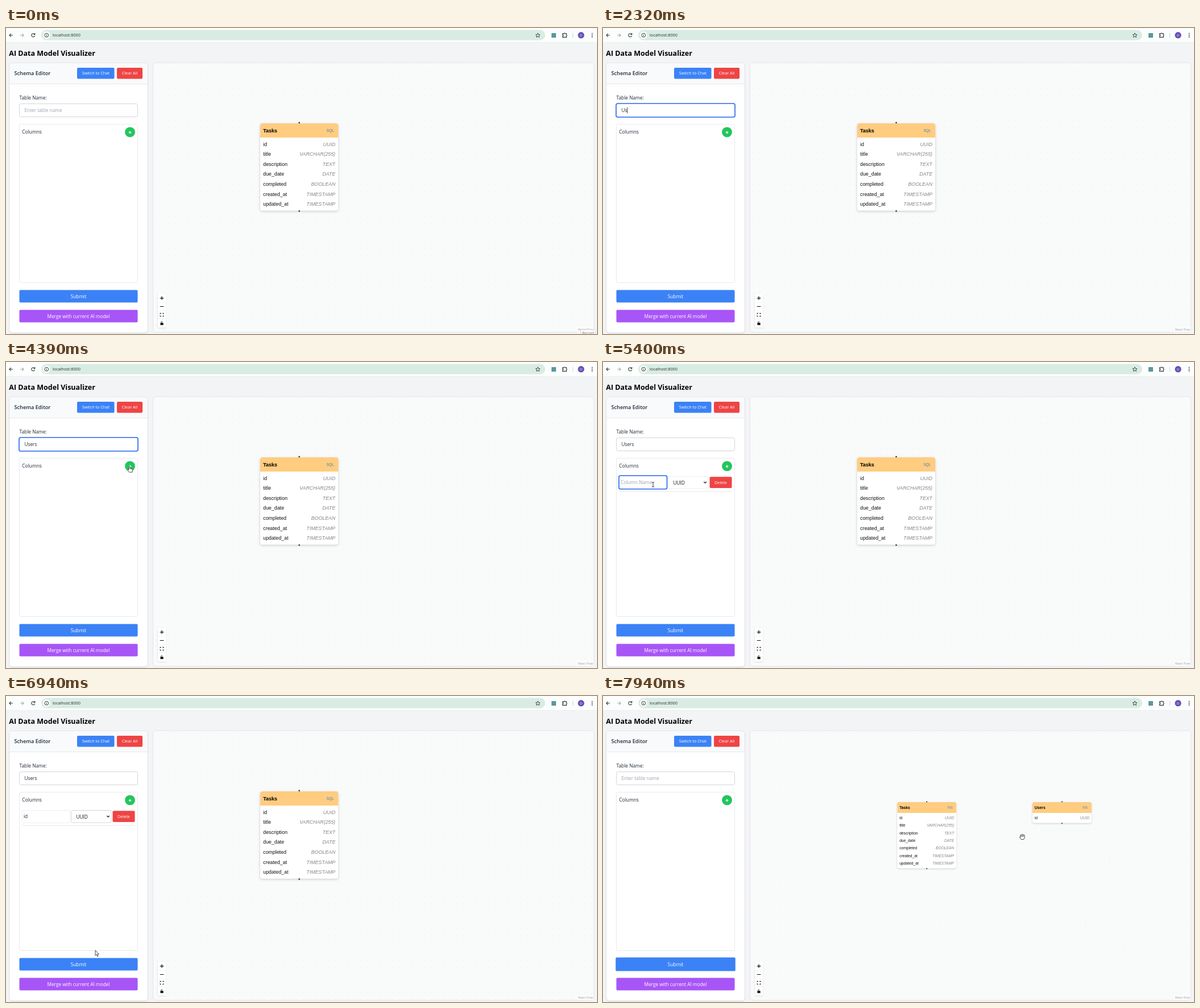
Recreate the animation shown at these times as an HTML page. Size 1039 px wide and 539 px high, loop 8000 ms.

```html
<!DOCTYPE html>
<html lang="en">
<head>
<meta charset="utf-8">
<title>Data model editor</title>
<style>
html, body { margin: 0; width: 100%; height: 100%; overflow: hidden; background: #f3f4f6; }
svg { display: block; font-family: "Open Sans", "Noto Sans", sans-serif; }
.node { font-family: "Liberation Sans", Arial, sans-serif; }
text { white-space: pre; }
</style>
</head>
<body>
<svg id="stage" width="1039" height="539" viewBox="0 0 1039 539"></svg>
<script>
const LOOP = 8000, STEP = 200 / 3;
const BLUE = '#3b82f6', INK = '#1f2937', MUTED = '#9ca3af', LINE = '#e5e7eb';

const rect = (x, y, w, h, fill, r = 0, more = '') =>
  `<rect x="${x}" y="${y}" width="${w}" height="${h}" rx="${r}" fill="${fill}" ${more}/>`;
const text = (x, y, s, size, fill, more = '') =>
  `<text x="${x}" y="${y}" font-size="${size}" fill="${fill}" ${more}>${s}</text>`;
const line = (d, stroke, w = 1, more = '') =>
  `<path d="${d}" fill="none" stroke="${stroke}" stroke-width="${w}" ${more}/>`;
const dot = (x, y, r, fill, more = '') =>
  `<circle cx="${x}" cy="${y}" r="${r}" fill="${fill}" ${more}/>`;
const group = (id, body, more = '') => `<g id="${id}" ${more}>${body}</g>`;
const MID = 'text-anchor="middle"', END = 'text-anchor="end"';
const stroke = c => `stroke="${c}"`;

function browserBar() {
  const dark = '#333b38';
  return rect(0, 0, 1039, 25, '#fbfefc') + rect(0, 25, 1039, 1, '#e9eeec') +
    rect(62, 3.5, 886, 18, '#d9ece4', 9) +
    line('M12 12.7H6M8.8 9.8L5.9 12.7L8.8 15.6', dark, 1.1) +
    line('M25 12.7H31M28.2 9.8L31.1 12.7L28.2 15.6', '#a3aaa7', 1.1) +
    line('M50.3 11A3 3 0 1 0 50.7 13.6M50.8 9V11.4H48.4', dark, 1.1) +
    dot(71.3, 12.7, 6.5, '#fbfefc') +
    dot(71.3, 12.7, 3.4, 'none', stroke(dark)) + line('M71.3 12.2V14.7M71.3 10.7V11.5', dark, .9) +
    text(82, 15.4, 'localhost:8000', 7.25, '#26302c') +
    line('M935 8.9L936.1 11.5L938.9 11.7L936.8 13.5L937.5 16.3L935 14.8L932.5 16.3L933.2 13.5L931.1 11.7L933.9 11.5Z', dark, .9) +
    rect(959, 9, 8, 8, '#5e979d') +
    line('M978.6 9.8H980.8A1.3 1.3 0 0 1 983.2 9.8H985.2V11.8A1.3 1.3 0 0 1 985.2 14.2V16.4H978.6V14.2A1.2 1.2 0 0 0 978.6 11.8Z', dark, 1.2) +
    rect(996, 9, 1, 8, '#b9ddd4') +
    dot(1011, 12.7, 5.6, '#6750b5') + text(1011, 14.7, 'D', 5.5, '#fff', MID) +
    [9.6, 12.7, 15.8].map(y => dot(1030.5, y, .95, dark)).join('');
}

function editor() {
  return text(5.3, 48.6, 'AI Data Model Visualizer', 12.5, '#000', 'font-weight="700"') +
    rect(6, 61.5, 243, 475, '#fff', 5, 'filter="url(#soft)"') +
    '<path d="M6 98V66.5a5 5 0 0 1 5-5h233a5 5 0 0 1 5 5V98Z" fill="#f9fafb"/>' +
    rect(6, 98, 243, 1, LINE) + rect(6, 61.5, 243, 475, 'none', 5, stroke('#e9ebee')) +
    text(14.5, 83.2, 'Schema Editor', 9.2, INK, 'font-weight="600"') +
    rect(125, 70, 65.5, 19.5, BLUE, 2) + text(157.8, 82.4, 'Switch to Chat', 7.25, '#fff', MID) +
    rect(195, 70, 45, 19.5, '#ef4444', 2) + text(217.5, 82.4, 'Clear All', 7.25, '#fff', MID) +
    text(23.5, 125.9, 'Table Name:', 8.35, INK) +
    rect(23.5, 133.5, 208, 23, '#fff', 3, stroke('#d1d5db')) +
    rect(23, 133, 209, 24, '#fff', 3, `id="nameRing" stroke="#2563eb" stroke-width="1.6"`) +
    text(32.5, 148.2, '', 8.25, MUTED, 'id="name"') +
    rect(23.5, 169.5, 208, 279, '#fff', 2, stroke('#e8eaed')) +
    text(28.3, 186.4, 'Columns', 8.4, INK) +
    dot(218, 183.4, 8.9, '#22c55e') + line('M218 181.4V186.4M215.5 183.9H220.5', '#fff', 1.2) +
    group('submit', rect(23.5, 461.5, 208, 22, BLUE, 2) + text(127.4, 475.6, 'Submit', 8.25, '#fff', MID)) +
    rect(23.5, 496.5, 208, 22, '#a855f7', 2) +
    text(127.4, 510.7, 'Merge with current AI model', 8.25, '#fff', MID) +
    group('row',
      rect(28.5, 201.5, 84, 22, '#fff', 2, stroke('#eceef0')) +
      rect(28, 200.3, 84.5, 23.4, '#fff', 2.5, 'id="colRing" stroke="#2563eb" stroke-width="1.6"') +
      text(31, 215.2, '', 8.25, MUTED, 'id="col"') +
      rect(115, 201.5, 70, 21.5, '#fff', 2, 'id="select" stroke="#d1d5db"') +
      text(123.4, 215.6, 'UUID', 8.25, '#111') + line('M177.4 211L179.6 213.2L181.8 211', '#111', 1.2) +
      rect(187.5, 202.2, 39, 19.8, '#ef4444', 2) + text(207, 214.8, 'Delete', 7.25, '#fff', MID) +
      rect(28, 227.5, 199, 1, LINE)) +
    group('menu', rect(77.5, 162, 84.5, 24, '#fff', 3, 'filter="url(#soft)"') +
      text(84, 176.4, "Recipe's", 6.9, '#1c2421')) +
    rect(0, 0, .8, 11, '#111', 0, 'id="caret"');
}

function table(x, name, rows) {
  const y = 168, w = 137, step = 17.58, h = 30.4 + rows.length * step, cx = x + w / 2;
  return rect(x, y, w, h, '#fff', 4, 'filter="url(#lift)"') +
    `<path d="M${x} ${y + 25}V${y + 4}a4 4 0 0 1 4-4h${w - 8}a4 4 0 0 1 4 4v21Z" fill="#ffcc80"/>` +
    text(x + 5, y + 16.2, name, 9, '#000', 'font-weight="700"') +
    text(x + w - 7.5, y + 14.7, 'SQL', 6.5, '#3f83b8', END) +
    rows.map(([key, type], i) => {
      const by = y + 39.6 + i * step;
      return text(x + 5, by, key, 8.9, '#111') +
        text(x + w - 5, by, type, 8.8, '#85858a', END + ' font-style="italic"');
    }).join('') +
    dot(cx, y - 1.2, 1.3, '#222') + dot(cx, y + h + 1, 1.3, '#222');
}

function canvas() {
  const tasks = [['id', 'UUID'], ['title', 'VARCHAR(255)'], ['description', 'TEXT'], ['due_date', 'DATE'],
    ['completed', 'BOOLEAN'], ['created_at', 'TIMESTAMP'], ['updated_at', 'TIMESTAMP']];
  const icons = line('M270.7 475.8H277.3M274 472.5V479.1M270.7 490.5H277.3', '#111', 1.2) +
    line('M271 504V502.4H272.8M275.2 502.4H277V504M277 506.3V507.9H275.2M272.8 507.9H271V506.3', '#111', 1) +
    rect(271.4, 519.3, 5.2, 4, '#111', .6) + line('M272.6 519.5V518.3A1.4 1.4 0 0 1 275.2 517.8', '#111', .9);
  return rect(258.5, 61, 775, 475, '#f9fafa', 5, stroke('#e2e5e8')) +
    `<g clip-path="url(#view)">` + rect(259, 61.5, 774, 474, 'url(#dots)', 5) +
    group('world', table(447, 'Tasks', tasks) + group('users', table(761, 'Users', [['id', 'UUID']])), 'class="node"') +
    '</g>' + rect(267, 468.5, 14.2, 59, '#fff', 0, 'filter="url(#soft)"') +
    [483, 497.7, 512.4].map(y => rect(267, y, 14.2, .7, '#eee')).join('') + icons +
    rect(1004, 526, 29, 9.5, '#fff', 0, 'opacity=".5"') +
    text(1006, 532.7, 'React Flow', 5.2, '#999') +
    group('record', rect(1010.5, 531.5, 26, 12, '#fafafa', 1, stroke('#ddd')) +
      text(1013, 539.6, 'Record', 6.4, '#777'));
}

const shape = (d, w = .8) => `<path d="${d}" fill="#fff" stroke="#222" stroke-width="${w}" stroke-linejoin="round"/>`;
const pointers = {
  arrow: shape('M0 0V9.2L2.1 7.3L3.7 10.8L5.1 10.2L3.6 6.8H6.4Z'),
  beam: line('M-2.2 -4.3Q0 -4.3 0 -3V3Q0 4.3 -2.2 4.3M2.2 -4.3Q0 -4.3 0 -3M0 3Q0 4.3 2.2 4.3', '#222', .9),
  hand: shape('M-1 6V.6Q0 -.8 1 .6V4L5 5Q6 5.3 5.8 6.5L5 10.5H-.6L-3.4 6.6Q-3 5.3 -1 6.4Z'),
  grab: shape('M-2.2 4.5L-4.6 1Q-4.6 -.6 -2.8 .6L-3.4 -2.4Q-2.8 -4 -1.8 -2.6L-1.6 -3.8Q-.6 -5.2 .4 -3.8Q1.6 -5 2.3 -3.2Q3.8 -4 4.2 -2.2V1.6L2.8 4.5ZM-1.7 -2.6L-1.2 0M.4 -3.7V-.2M2.3 -3.1L2.1 0')
};

const stage = document.getElementById('stage');
stage.innerHTML = `<defs>
  <filter id="soft" x="-10%" y="-20%" width="120%" height="150%"><feDropShadow dx="0" dy=".8" stdDeviation="1.2" flood-opacity=".16"/></filter>
  <filter id="lift" x="-10%" y="-20%" width="120%" height="150%"><feDropShadow dx="0" dy="1.4" stdDeviation="2" flood-opacity=".2"/></filter>
  <clipPath id="view">${rect(259, 61.5, 774, 474, '#fff', 5)}</clipPath>
  <pattern id="dots" width="11.25" height="11.25" patternUnits="userSpaceOnUse">${dot(5.6, 5.6, .55, '#dfe3e6')}</pattern>
  </defs>` + rect(0, 0, 1039, 539, '#f3f4f6') + browserBar() + editor() + canvas() +
  Object.entries(pointers).map(([id, d]) => group(id, d)).join('');

const el = Object.fromEntries([...stage.querySelectorAll('[id]')].map(e => [e.id, e]));
const show = (e, on) => e.setAttribute('display', on ? 'inline' : 'none');
const between = (t, a, b) => t >= a && t < b;

// time, x, y of the pointer's hot spot
const path = [
  [70, 985, 520], [330, 480, 330], [470, 170, 190], [600, 83, 154], [3060, 83, 154],
  [3260, 105, 250], [3520, 160, 395], [3660, 192, 413], [3760, 208, 370], [3920, 206, 228],
  [4130, 217, 184], [4670, 217, 183], [4800, 140, 205], [4870, 92, 214], [5000, 88, 216],
  [6070, 88, 216], [6270, 106, 290], [6540, 148, 420], [6740, 157, 448], [6940, 157, 448],
  [7140, 150, 470], [7270, 162, 473], [7410, 248, 442], [7540, 430, 350], [7740, 715, 254], [7810, 737, 248]
];

function pointerAt(t) {
  const i = path.findIndex(p => p[0] > t);
  if (i < 0) return path[path.length - 1].slice(1);
  if (i === 0) return [1024, 545];
  const [t0, x0, y0] = path[i - 1], [t1, x1, y1] = path[i], k = (t - t0) / (t1 - t0);
  return [x0 + (x1 - x0) * k, y0 + (y1 - y0) * k];
}

function pointerKind(x, y, t) {
  if (between(x, 259, 1033) && y < 536) return 'grab';
  if (between(x, 23, 232) && between(y, 133, 157)) return 'beam';
  if (t > 4500 && between(x, 28, 113) && between(y, 201, 224)) return 'beam';
  if (Math.hypot(x - 218, y - 183) < 9 || (between(x, 23, 232) && between(y, 461, 484))) return 'hand';
  return 'arrow';
}

const typed = (word, times, t) => word.slice(0, times.filter(at => t >= at).length);

function field(e, value, hint) {
  e.textContent = value || hint;
  e.setAttribute('fill', value ? INK : MUTED);
}

function draw(now) {
  const t = Math.floor((now % LOOP + 4) / STEP) * STEP + 1;
  const sent = t >= 7140;
  const name = sent ? '' : typed('Users', [1930, 2130, 2320, 2520, 2660], t);
  const col = typed('id', [5600, 5667], t);
  const onName = between(t, 800, 4400), onCol = between(t, 4870, 6670);

  field(el.name, name, 'Enter table name');
  field(el.col, col, 'Column Name');
  show(el.nameRing, onName);
  show(el.colRing, onCol);
  el.select.setAttribute('stroke', onCol ? '#eceef0' : '#d1d5db');
  show(el.menu, between(t, 866, 2000));
  show(el.row, t >= 4530 && !sent);
  show(el.users, sent);
  show(el.record, t < 66);
  el.submit.setAttribute('transform', sent ? 'translate(127.5 472.5) scale(1.012 1.1) translate(-127.5 -472.5)' : '');

  const blink = t < 1860 ? t < 1330 : t < 4800 ? t < 3190 || between(t, 3720, 4250) : t < 5400 || between(t, 5600, 6200);
  show(el.caret, (onName || onCol) && blink);
  const width = (onName ? name : col) ? (onName ? el.name : el.col).getComputedTextLength() : 0;
  el.caret.setAttribute('x', (onName ? 32.5 : 31) + width);
  el.caret.setAttribute('y', onName ? 139.5 : 206.5);

  const s = t < 7866 ? 1 : t < 7932 ? .87 : .757;
  const zoom = `translate(736.5 246.5) scale(${s}) translate(-736.5 -246.5)`;
  el.world.setAttribute('transform', zoom);
  el.dots.setAttribute('patternTransform', zoom);

  const [x, y] = pointerAt(t), kind = pointerKind(x, y, t);
  const hidden = between(t, 1930, 3120) || between(t, 5600, 6130);
  for (const id in pointers) {
    show(el[id], id === kind && !hidden);
    el[id].setAttribute('transform', `translate(${x} ${y})`);
  }
}

const start = performance.now();
function tick() {
  draw(performance.now() - start);
  requestAnimationFrame(tick);
}
tick();
</script>
</body>
</html>
```
